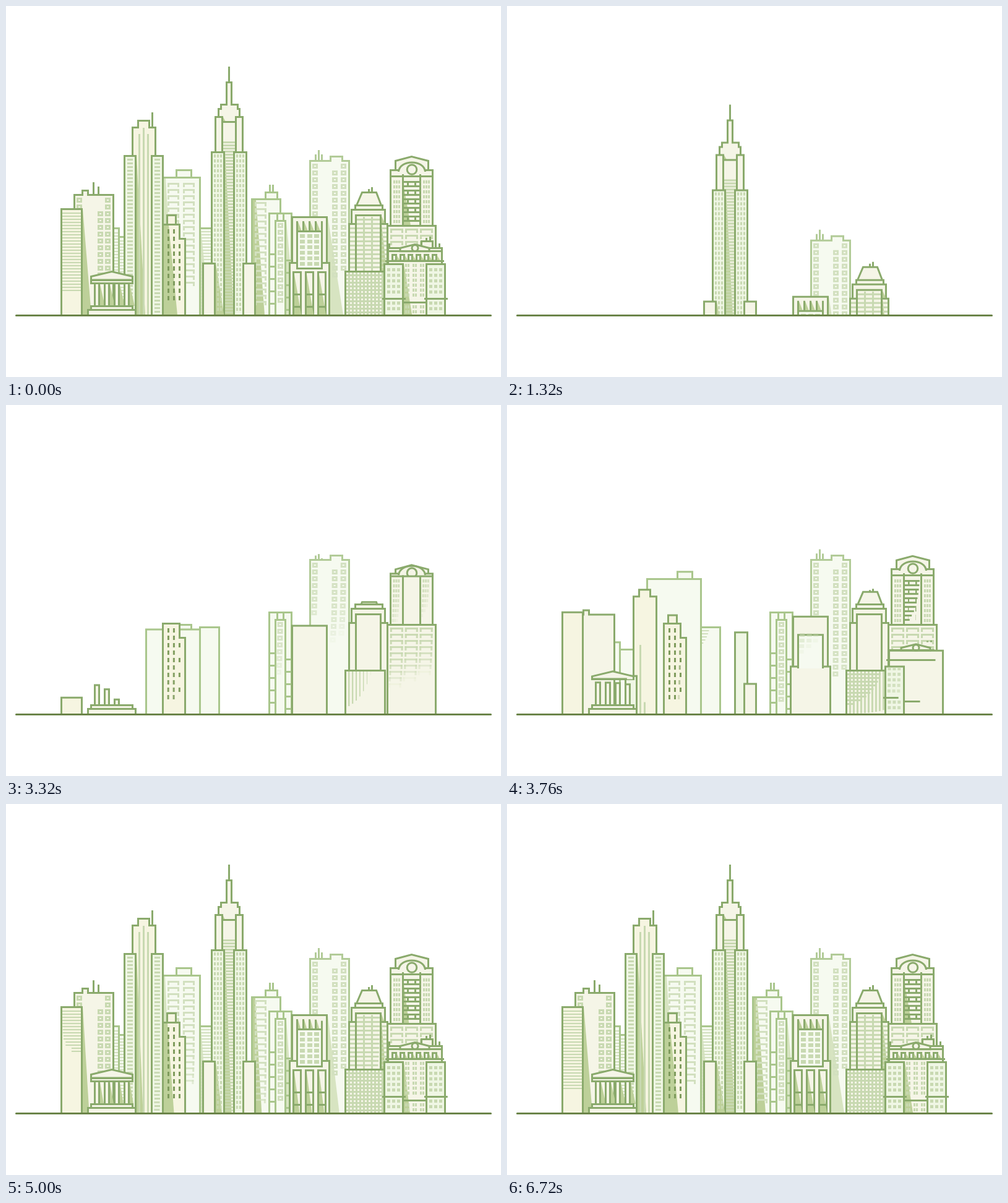
An HTML page with a canvas that plays this animation: 800x600 px, repeating every 9.12 s.

```html
<!DOCTYPE html>
<html lang="en">
<head>
<meta charset="utf-8">
<title>Skyline</title>
<style>
html, body { margin: 0; width: 100%; height: 100%; overflow: hidden; background: #fff; }
canvas { display: block; }
</style>
</head>
<body>
<canvas id="stage" width="800" height="600"></canvas>
<script>
const c = document.getElementById('stage').getContext('2d');
const LOOP = 9120, BUILD = 1880, DUSK = 4800, GROUND = 500;
const DARK = '#8aaa6c', MID = '#a9c68c', PALE = '#b2cb98';
const BEIGE = '#f5f5e7', CREAM = '#f6f5e1', MINT = '#eff6e4', ICE = '#f6faf0';
const WIN = '#c8d9b1', SOFT = '#d2e0bf', HAZE = '#d7e4c1', SHADE = '#bdd099', SLATE = '#7f9c5d';
let T = 0, ink = DARK, paint = BEIGE;

// Ways to draw one window.
const pane = (x, y, w, h) => c.fillRect(x, y, w, h);
const ring = (x, y, w, h) => c.strokeRect(x + 1.5, y + 1.5, w - 3, h - 3);
const hood = (x, y, w, h) => {
  pane(x, y, w, 3);
  pane(x, y, 3, h);
  pane(x + w - 3, y, 3, h);
};

// n columns dx apart, rows dy apart, gap ms between rows, odd rows weave ms later.
const SLIT = { w: 9, h: 3, dy: 6, gap: 6, weave: 450 };
const DOTS = { n: 3, dx: 5, w: 3, h: 5, dy: 8, gap: 8, pad: 3.5, weave: 450 };
const FINE = { n: 3, dx: 4, w: 3, h: 5, dy: 8, pad: 6.5 };
const PAIR = { ...FINE, n: 2, pad: 4.5 };
const CELL = { n: 3, dx: 8, w: 5, h: 5, dy: 9, pad: 6.5 };
const GLASS = { n: 3, dx: 11.5, w: 8, h: 6, dy: 9 };
const RING = { w: 9, h: 8, dy: 11, gap: 40, draw: ring };
const HOOD = { n: 2, dx: 25, w: 19, h: 7, dy: 10, gap: 50, draw: hood };
const TICK = { n: 2, dx: 9, w: 3, h: 7, dy: 12, pad: 7.5 };

// Progress of a part that starts at t0; halves its remainder every 100 ms.
function grow(t0) {
  const age = T - t0;
  if (T < BUILD || age > 900) return 1;
  return age <= 0 ? 0 : 1 - 2 ** (-age / 100);
}

// A building that sinks into the ground from the given time on.
function building(out, stroke, fill, draw) {
  const q = T < BUILD ? Math.min(1, Math.max(0, (T - out) / 765)) : 0;
  ink = stroke;
  paint = fill;
  c.save();
  c.translate(0, 406 * q ** 3.5);
  draw();
  c.restore();
}

// Slides a part up from behind its bottom edge.
function rise(t0, top, bottom, draw) {
  const p = grow(t0);
  if (!p) return;
  c.save();
  c.beginPath();
  c.rect(0, 0, 800, bottom + 1.5);
  c.clip();
  c.translate(0, (1 - p) * (bottom - top + 3));
  c.strokeStyle = ink;
  c.lineWidth = 3;
  draw();
  c.restore();
}

function poly(t0, points, fill = paint) {
  const ys = points.map(p => p[1]);
  rise(t0, Math.min(...ys), Math.max(...ys), () => {
    c.beginPath();
    points.forEach(p => c.lineTo(...p));
    c.closePath();
    c.fillStyle = fill;
    c.fill();
    c.stroke();
  });
}

// Stepped outline of stacked blocks [left, right, top], widest first.
function tower(t0, ...blocks) {
  const left = [], right = [];
  let foot = GROUND + 5;
  for (const [x, x2, y] of blocks) {
    left.push([x, foot], [x, y]);
    right.unshift([x2, y], [x2, foot]);
    foot = y;
  }
  poly(t0, [...left, ...right]);
}

const area = (t0, cx, y, y2 = GROUND) => ({ t0, cx, y, y2 });

function box(t0, x, y, x2, y2 = GROUND + 5, fill) {
  poly(t0, [[x, y], [x2, y], [x2, y2], [x, y2]], fill);
  return area(t0, (x + x2) / 2, y, Math.min(y2, GROUND));
}

function disc(x, y, r) {
  c.beginPath();
  c.arc(x, y, r, 0, 7);
  c.fill();
  c.stroke();
}

function mast(t0, x, y, y2, color = ink) {
  rise(t0, y, y2, () => {
    c.fillStyle = color;
    pane(x - 1.5, y, 3, y2 - y);
  });
}

function bar(t0, x, y, w, h = 3, color = ink) {
  c.fillStyle = color;
  pane(x, y, w * grow(t0), h);
}

// Horizontal bars from y down to y2.
function rungs(t0, gap, x, w, y, y2, step, h = 3, color = ink) {
  for (; y < y2; y += step, t0 += gap) bar(t0, x, y, w, h, color);
}

// Shadow wedge whose foot spreads to the right.
function shade(x, y, { y2 = GROUND, head = 0, color = SHADE, foot = Math.min(14, 4 + (y2 - y) / 9) } = {}) {
  const p = grow(DUSK);
  c.fillStyle = color;
  c.beginPath();
  c.moveTo(x, y);
  c.lineTo(x + head * p, y);
  c.lineTo(x + (head + foot) * p, y2);
  c.lineTo(x, y2);
  c.fill();
}

// Fills an area with centred columns of windows, row after row.
function windows(a, style, delay = 300, color = WIN) {
  const { n = 1, dx = 0, w, h, dy, gap = 30, pad = 4.5, weave = 0, draw = pane } = style;
  c.fillStyle = c.strokeStyle = color;
  c.lineWidth = 3;
  for (let r = 0, y = a.y + pad; y + h <= a.y2; r++, y += dy) {
    for (let k = 0; k < n; k++) {
      const p = grow(a.t0 + delay + gap * (r + k) + weave * (r % 2));
      if (!p) continue;
      c.globalAlpha = p;
      draw(Math.round(a.cx + (k - (n - 1) / 2) * dx - w / 2) - 4 * (1 - p), Math.floor(y), w, h);
    }
  }
  c.globalAlpha = 1;
}

function slab() {
  for (let i = -1; i < 2; i++) mast(3190 + 60 * i, 505.5 + 5 * i, 233 + 7 * Math.abs(i), 250);
  tower(2120, [491.5, 554.5, 250.5], [524.5, 543.5, 243.5]);
  shade(520, 341, { foot: 25, color: HAZE });
  windows(area(2900, 499.5, 250.5, 345), RING, 0, SOFT);
  windows(area(2900, 531.5, 261.5, 440), RING, 0, SOFT);
  windows(area(2900, 545.5, 250.5, 430), RING, 0, SOFT);
}

function annex() {
  for (let i = 0; i < 2; i++) {
    box(3500, 160 + 22.5 * i, 359.5 + 14 * i, 182.5 + 22.5 * i);
    rungs(3800, 30, 175 + 9 * i, 6, 366 + 13 * i, 480, 5, 2, SOFT);
  }
}

function wideBlock() {
  box(3178, 275.5, 265.5, 299.5);
  box(3178, 226.5, 277.5, 313.5);
  shade(254, 279, { head: 4, color: HAZE });
  windows(area(4020, 283, 281.5, 454), HOOD, 0, SOFT);
}

function stripedBlock() {
  box(2150, 313.5, 359.5, 344.5);
  shade(315, 361, { color: HAZE });
  rungs(3600, 35, 315, 17, 364, 490, 5, 2, SOFT);
}

function midBlock() {
  for (const x of [426.5, 431.5]) mast(4200, x, 289, 302);
  box(3851, 419.5, 301.5, 438.5);
  const wall = box(3821, 397.5, 312.5, 443.5);
  shade(399, 314, { head: 5 });
  windows({ ...wall, cx: 411.5, y2: 490 }, { ...HOOD, n: 1 }, 200, SOFT);
}

function ladder() {
  box(2150, 425.5, 335.5, 461.5);
  shade(453, 348, { color: HAZE });
  for (let i = 0; i < 2; i++) rungs(2700, 50, 427 + 25 * i, 9, 400 + 10 * i, GROUND, 20);
  box(2200, 438.5, 335.5, 448.5);
  const shaft = box(2150, 435.5, 347.5, 451.5);
  windows({ ...shaft, y2: 481 }, { ...RING, pad: 3.5 }, 850, SOFT);
}

function leftPair() {
  for (let i = 0; i < 2; i++) mast(4250, 141.5 + 8 * i, 285 + 7 * i, 305);
  tower(3496, [110.5, 173.5, 305.5], [123.5, 132.5, 298.5]);
  shade(124, 328);
  windows(area(3950, 118.5, 305.5, 331), RING, 0);
  windows(area(4000, 152.5, 327.5, 440), RING, 0);
  windows(area(3900, 164.5, 305.5, 440), RING, 0);
  box(3290, 89.5, 328.5, 122.5, undefined, CREAM);
  c.fillStyle = WIN;
  for (let i = 0; i < 26; i++) {
    const w = 30 * grow(4000 + 150 * (i >> 1));
    pane(121 - w, 334 + 5 * i, w, 2);
  }
}

function twinTower() {
  mast(3850, 236.5, 172, 208);
  tower(3610, [204.5, 241.5, 196.5], [213.5, 231.5, 185.5]);
  shade(211, 242);
  for (let i = -1; i < 2; i++) mast(3750 + 60 * i, 222.5 + 7 * i, 197 + 10 * Math.abs(i), GROUND, WIN);
  for (let i = 0; i < 2; i++) {
    const x = 191.5 + 44 * i;
    windows(box(3717 + 170 * i, x, 242.5, x + 18, undefined, MINT), SLIT, 150);
  }
}

function stepBlock() {
  box(3400, 260.5, 338.5, 274.5, 353.5);
  tower(2150, [253.5, 289.5, 376.5], [253.5, 280.5, 353.5]);
  shade(255, 355, { head: 8 });
  windows(area(2700, 267, 353.5, 477), TICK, 0, SLATE);
  windows(area(2700, 280.5, 377.5, 477), { ...TICK, n: 1, weave: 800 }, 0, SLATE);
}

function spireTower() {
  tower(3916, [343.5, 377.5, 166.5], [347.5, 374.5, 159.5], [356.5, 364.5, 123.5], [360.5, 360.5, 98]);
  shade(350, 178, { y2: 187 });
  const core = box(3950, 349.5, 187.5, 371.5);
  shade(354, 236);
  windows({ ...core, y: 214.5 }, { ...SLIT, w: 19, dy: 5 }, 80);
  for (let i = 0; i < 2; i++) {
    const x = 332.5 + 36 * i;
    box(3856, 338.5 + 33 * i, 179.5, 349.5 + 33 * i);
    const wing = box(3773 - 117 * i, x, 236.5, x + 20, undefined, MINT);
    if (!i) shade(339, 416);
    windows(wing, DOTS, 200);
  }
  box(3880, 318.5, 416.5, 337.5);
  box(3620, 383.5, 416.5, 402.5);
}

function gallery() {
  box(2979, 462.5, 341.5, 518.5);
  for (let i = 0; i < 5; i++) {
    if (i < 4) shade(472 + 10 * i, 349, { y2: 363 });
    mast(3900 + 200 * i, 470.5 + 10 * i, 348, 366);
  }
  box(3400, 458.5, 415.5, 522.5);
  windows(box(3450, 470.5, 364.5, 510.5, 424.5, ICE), GLASS, 200);
  for (let i = 0; i < 3; i++) {
    const x = 464.5 + 20 * i, t0 = i ? 4146 : 3980;
    box(t0, x, 430.5, x + 12);
    shade(x + 1.5, 434);
    rungs(t0 + 50, 40, x, 12, 465, GROUND, 20);
  }
}

function archTower() {
  poly(2910, [[629.5, 505], [629.5, 250.5], [655.5, 243.5], [682.5, 250.5], [682.5, 505]]);
  box(2813, 621.5, 265.5, 689.5);
  rise(2813, 265.5, 505, () => {
    c.fillStyle = BEIGE;
    c.beginPath();
    c.moveTo(634.5, 268);
    c.bezierCurveTo(636, 248, 676, 248, 677.5, 268);
    c.fill();
    pane(634.5, 262, 43, 10);
    c.stroke();
    disc(656, 264.5, 7.8);
  });
  box(2600, 621.5, 275.5, 689.5);
  for (let i = 0; i < 2; i++) mast(2850 + 80 * i, 641.5 + 28 * i, 272, 356);
  shade(643, 292, { y2: 355 });
  for (let i = 0; i < 5; i++) {
    const y = 283 + 14 * i, t0 = 3400 + 70 * i;
    rungs(t0, 30, 643, 26, y, y + 8, 7);
    for (const x of [648, 660]) bar(t0 + 60, x, y, 3, 9);
  }
  for (let i = 0; i < 2; i++) windows(area(3000 + 80 * i, 631.5 + 48 * i, 275.5, 354), FINE, 0);
}

function lowBlock() {
  const wall = box(2150, 616.5, 355.5, 694.5);
  windows({ ...wall, y2: 480 }, { ...HOOD, n: 3, dx: 24, w: 21 }, 700);
}

function capTower() {
  for (let i = 0; i < 2; i++) mast(3600, 586.5 + 5 * i, 296 - 3 * i, 303);
  poly(2962, [[566.5, 505], [566.5, 322.5], [575.5, 301.5], [598.5, 301.5], [606.5, 322.5], [606.5, 505]]);
  box(2200, 564.5, 322.5, 608.5);
  box(2150, 558.5, 329.5, 612.5);
  shade(607, 340, { y2: 351 });
  box(2150, 554.5, 352.5, 616.5);
  shade(607, 352, { y2: 429, foot: 8 });
  for (let i = 0; i < 2; i++) rungs(3950 + 300 * i, 40, 556 + 51 * i, 8, 358, 428, 7, 3, WIN);
  box(2150, 565.5, 338.5, 605.5);
  rungs(4180, 40, 567, 37, 344, 428, 7, 3, WIN);
  for (let i = 0; i < 2; i++) mast(4140, 578.5 + 13 * i, 341, 429, WIN);
  box(2150, 548.5, 429.5, 612.5);
  for (let i = 0; i < 10; i++) bar(3080 + 38 * i, 553 + 6 * i, 431, 3, 69 * grow(3080 + 38 * i), WIN);
  rungs(3450, 35, 550, 61, 434, GROUND, 6, 3, WIN);
}

function hall() {
  for (let i = 0; i < 2; i++) {
    mast(4250, 619.5 + 81 * i, 384, 393);
    mast(3700, 679.5 + 6 * i, 375 - 2 * i, 382);
  }
  box(3900, 671.5, 380.5, 689.5, 392);
  box(3330, 617.5, 391.5, 704.5);
  poly(3400, [[637, 391.5], [661, 385.5], [684, 391.5], [684, 397], [637, 397]]);
  rise(3400, 386, 397, () => {
    c.fillStyle = BEIGE;
    disc(661, 391.5, 5);
  });
  bar(3500, 617, 395, 88);
  for (let i = 0; i < 6; i++) {
    const x = 624.5 + 13 * i;
    box(3800 + 130 * i, x, 402.5, x + 6, 412);
    shade(x + 7, 403, { y2: 411 });
  }
  bar(3500, 613, 411, 95);
  shade(643, 417);
  for (let i = 0; i < 3; i++) {
    windows(area(3800 + 60 * i, 648.5 + 12 * i, 412.5, 474), PAIR, 0);
    windows(area(3900 + 60 * i, 648.5 + 12 * i, 479.5), PAIR, 0);
  }
  bar(3600, 642, 478, 38);
  for (let i = 0; i < 2; i++) {
    const x = 611.5 + 68 * i;
    const wing = box(3360 + 667 * i, x, 417.5, x + 30, undefined, MINT);
    windows({ ...wing, y2: 473 }, CELL, 100);
    windows({ ...wing, y: 471.5 }, CELL, 100);
    bar(wing.t0 + 250, x - 3.5, 472, 38);
  }
}

function temple() {
  for (let i = 0; i < 4; i++) {
    const x = 143.5 + 16 * i;
    box(3000 + 130 * i, x, 448.5, x + 7, 488);
    shade(x + 8.5, 450, { y2: 485 });
  }
  box(2200, 137.5, 485.5, 204.5, 492);
  box(2150, 132.5, 491.5, 209.5);
  box(4230, 137.5, 443.5, 204.5, 448.5);
  poly(3400, [[137.5, 443.5], [137.5, 437.5], [171, 429.5], [204.5, 437.5], [204.5, 443.5]]);
  bar(3500, 137, 441.5, 68);
}

function frame(now) {
  T = now % LOOP;
  c.clearRect(0, 0, 800, 600);
  c.save();
  c.beginPath();
  c.rect(0, 0, 800, GROUND);
  c.clip();
  building(770, PALE, ICE, slab);
  building(136, MID, ICE, annex);
  building(238, MID, ICE, wideBlock);
  building(238, MID, ICE, stripedBlock);
  building(291, MID, ICE, midBlock);
  building(291, MID, ICE, ladder);
  building(136, DARK, BEIGE, leftPair);
  building(416, DARK, CREAM, twinTower);
  building(416, DARK, CREAM, stepBlock);
  building(875, DARK, BEIGE, spireTower);
  building(770, DARK, BEIGE, gallery);
  building(582, DARK, BEIGE, archTower);
  building(780, DARK, BEIGE, capTower);
  building(582, DARK, BEIGE, lowBlock);
  building(582, DARK, BEIGE, hall);
  building(531, DARK, BEIGE, temple);
  c.restore();
  c.strokeStyle = '#6b8449';
  c.lineWidth = 3;
  c.lineCap = 'round';
  c.beginPath();
  c.moveTo(16.5, 500.5);
  c.lineTo(783.5, 500.5);
  c.stroke();
  c.lineCap = 'butt';
}

const start = performance.now();
function tick() {
  frame(performance.now() - start);
  requestAnimationFrame(tick);
}
tick();
</script>
</body>
</html>
```
